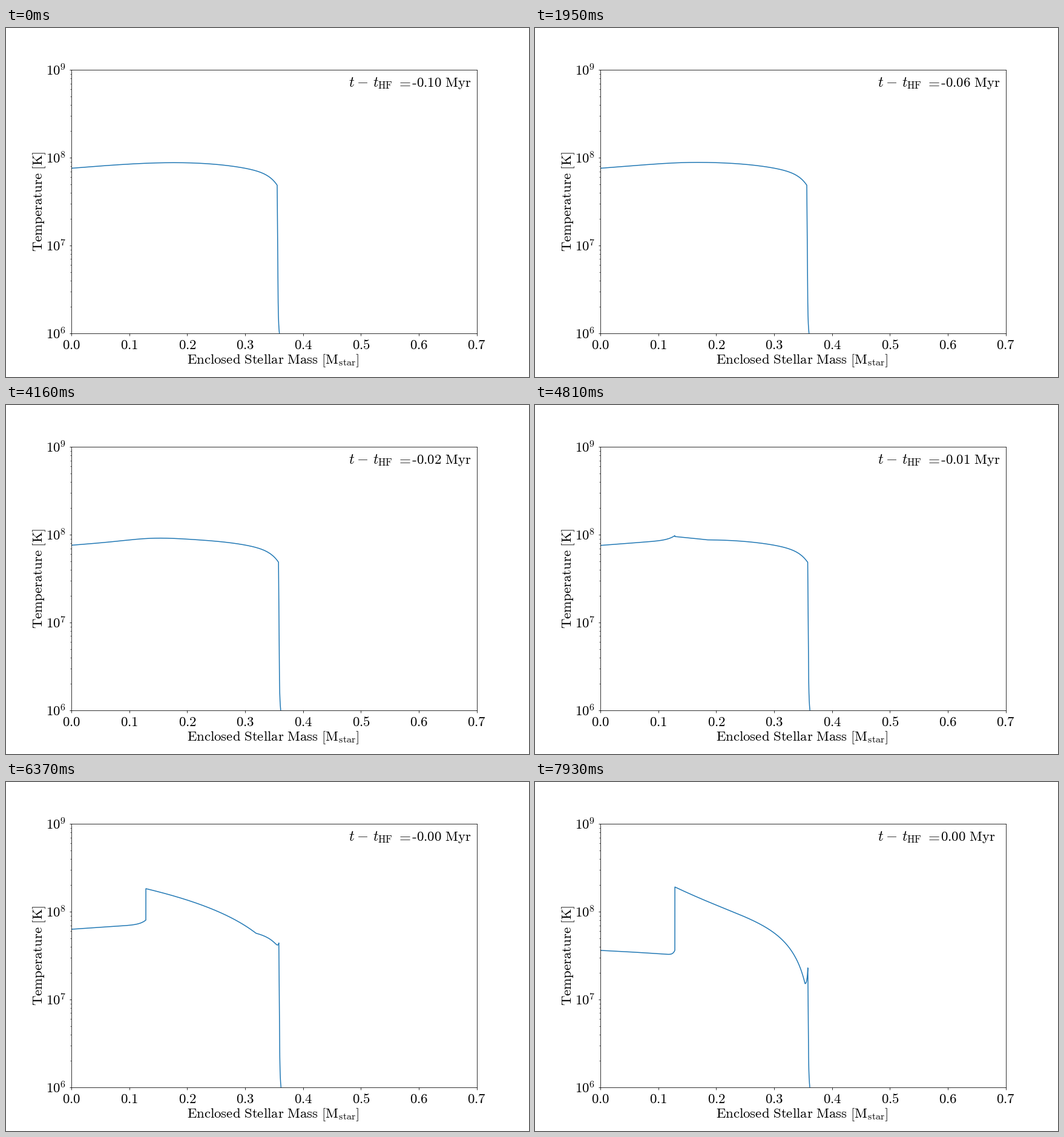
Write a matplotlib script that moves like this. It is 864 px wide and 576 px high and loops after 8000 ms.

```python
import numpy as np
import matplotlib.pyplot as plt
from matplotlib.animation import FuncAnimation

W, H, DPI = 864, 576, 72
LOOP, STEPS = 8000, 62
SIZE = 22.8
FLASH = 35          # step at which the hot shell appears
SHELL = .1286       # mass coordinate where the shell ignites

plt.rcParams["mathtext.fontset"] = "cm"


def ramp(k, mid, width):
    return 1 / (1 + np.exp((mid - k) / width))


# Temperatures below are in millidex relative to 1e8 K.
def kelvin(v):
    return 1e8 * 10 ** (v / 1000)


def quiet(m, edge):
    u = m / edge
    return -120 + 185 * u - 266 * u ** 3.2 - 112 * u ** 25


def flash(k, edge):
    """Cooled core, hot convective shell and cooled outer layers."""
    cool = 340 * ramp(k, 52.57, 3.02)
    spent = max(0, k - 49)
    kink = edge - .0045 - .1748 * ramp(-k, -45.39, 2.6)

    m_core = np.linspace(0, SHELL, 200)
    upturn = 55 * np.exp((m_core - SHELL) / (.013 - 3e-5 * cool))
    core = quiet(m_core, edge) - cool * (1 + m_core * cool / 120) + upturn

    m_out = np.linspace(kink, edge, 100)
    spike = .72 * cool * np.exp((m_out - edge) / .0016)
    outer = quiet(m_out, edge) - 1.1 * cool - .002 * cool ** 2 + spike

    # The shell is nearly linear in temperature and sags as it relaxes.
    s = np.linspace(0, 1, 120)
    peak = quiet(SHELL, edge) + 375 * ramp(k, 43.23, 3.04) - .2 * spent ** 2
    top, foot = kelvin(peak), kelvin(outer[0])
    sag = .145e8 * spent * s * (1 - s) * (.75 - s)
    shell = top + (foot - top) * s - sag

    mass = np.r_[m_core, SHELL + .0001 + s * (kink - SHELL - .0001), m_out]
    return mass, np.r_[kelvin(core), shell, kelvin(outer)]


def profile(k):
    edge = .3554 + 7.2e-5 * min(k, 40)
    if k < FLASH:
        mass = np.linspace(0, edge, 300)
        bump = .02 * k ** 2 * np.exp(-((mass - .14) / .06) ** 2)
        temp = kelvin(quiet(mass, edge) + bump)
    else:
        mass, temp = flash(k, edge)
    # Steep fall at the surface of the core.
    last = np.log10(temp[-1])
    drop = np.linspace(last, 5.9, 60)
    m_drop = edge + .0012 * (last - drop) + .0018 * np.exp(8 * (6 - drop))
    return np.r_[mass, m_drop], np.r_[temp, 10 ** drop]


def clock(k):
    """Time in Myr; the steps become tiny close to the flash."""
    return -.1 + .0025 * k if k < 39 else (k - 51.5) * 1e-4


fig = plt.figure(figsize=(W / DPI, H / DPI), dpi=DPI, facecolor="white")
ax = fig.add_axes([.125, .125, .775, .755])
ax.set_yscale("log")
ax.set_xlim(0, .7)
ax.set_ylim(1e6, 1e9)
ax.set_xticks(np.arange(8) / 10)
ax.tick_params(which="both", labelleft=False, labelbottom=False)


def put(x, y, s, ha="left", size=SIZE, **kw):
    return fig.text(x / W, 1 - y / H, s, ha=ha, va="baseline", fontsize=size, **kw)


def roman(s):
    return r"$\mathrm{%s}$" % s.replace(" ", r"\ ")


for i in range(8):
    put(108.3 + i * 95.66, 529.5, roman(f"{i / 10:.1f}"), "center")
for p in range(6, 10):
    put(99.5, 513.5 - 145 * (p - 6), r"$\mathrm{10}^{\mathrm{%d}}$" % p, "right")

put(441.5, 554.5, roman("Enclosed Stellar Mass [M_{star}]"), "center")
put(60, 286.5, roman("Temperature [K]"), "center",
    rotation=90, rotation_mode="anchor")
put(566.5, 97, "$t -$", size=24.6)
put(605.5, 97, r"$t_{\mathrm{HF}}$", size=23.5)
put(645, 97, "$=$", size=24.6)
value = put(670, 97, "")
hyphen = plt.Line2D([671 / W, 677.3 / W], [1 - 91.8 / H] * 2, color="black",
                    lw=1.4, solid_capstyle="butt", transform=fig.transFigure)
fig.add_artist(hyphen)

line, = ax.plot([], [], color="#1f77b4", lw=1.5)


def update(k):
    line.set_data(*profile(k))
    t = clock(k)
    hyphen.set_visible(t < 0)
    value.set_x((678.3 if t < 0 else 670) / W)
    value.set_text(roman(f"{abs(t):.2f} Myr"))
    return line, value, hyphen


anim = FuncAnimation(fig, update, frames=STEPS, interval=LOOP / STEPS,
                     repeat=True, repeat_delay=0, blit=False)
plt.show()
```
